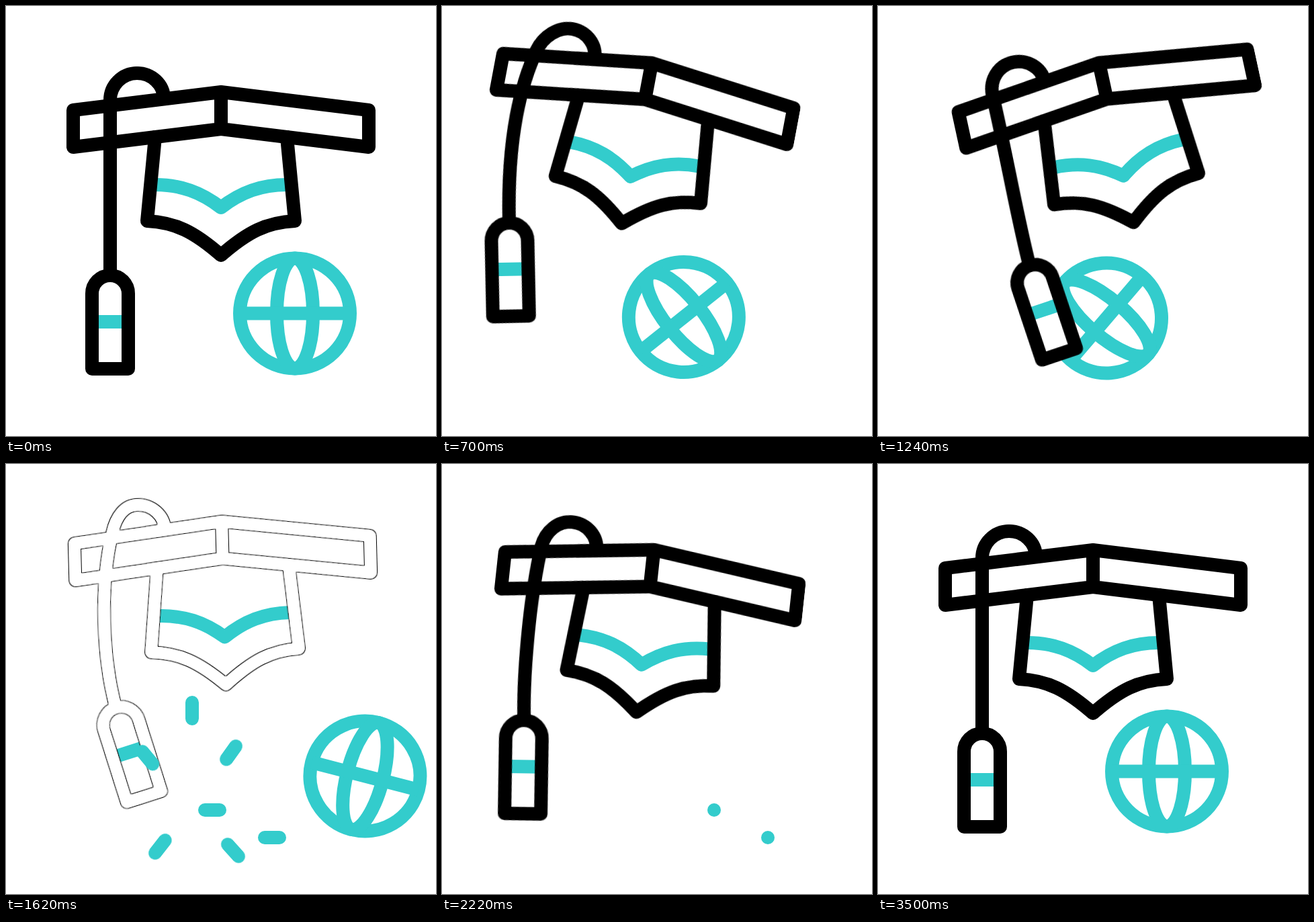
These frames come from a looping animation (640x640 px, 3560 ms). An HTML page without scripts:

```html
<!DOCTYPE html>
<html lang="en">
<head>
<meta charset="utf-8">
<title>Graduation cap and globe</title>
<style>
  html, body { margin: 0; width: 100%; height: 100%; overflow: hidden; background: #fff; }
  svg { display: block; width: 100vw; height: 100vh; }
  svg * { animation: 3560ms cubic-bezier(.37, 0, .63, 1) infinite; }

  .ink, .teal { fill: none; stroke-width: 20; stroke-linecap: round; stroke-linejoin: round; }
  .ink { stroke: #000; }
  .teal { stroke: #3cc; }
  .flat { stroke-linecap: butt; }

  .cap { transform-origin: 320px 86px; animation-name: lift, sway; }
  .tassel { transform-origin: 155px 400px; animation-name: swing; }
  .strand { animation-name: bend; }
  .ink { animation-name: hollow; animation-timing-function: step-end; }
  .globe { transform-origin: 430px 457.5px; animation-name: travel, roll; }
  .spark { animation-name: spark; }
  .trail { --run: 123px; animation-name: trail; }
  .short { --run: 114px; }
  .late { animation-delay: -2300ms; }

  @keyframes lift {
    0%, 6.18% { translate: 0 0; }
    16.85%, 52.25% { translate: 0 -42.4px; }
    61.8%, 100% { translate: 0 0; }
  }
  @keyframes sway {
    0%, 6.18% { rotate: 0deg; }
    24.16% { rotate: 12.4deg; }
    38.48% { rotate: -16.5deg; }
    52.25%, 52.81% { rotate: 12.4deg; }
    71.91%, 100% { rotate: 0deg; }
  }
  @keyframes swing {
    0%, 6.18% { rotate: 0deg; }
    19.66% { rotate: -11.8deg; }
    28.09% { rotate: -1deg; }
    44.94%, 45.6% { rotate: -16.1deg; }
    52.25% { rotate: -6deg; }
    62.36% { rotate: -5.3deg; }
    71.91%, 100% { rotate: 0deg; }
  }
  @keyframes bend {
    0%, 6.18% { d: path("M155 400C155 313 155 227 155 140C155 118 173 100 195 100"); }
    19.66% { d: path("M155 400C137 315 128 219 148 141C154 119 173 100 195 100"); }
    28.09% { d: path("M155 400C160 313 168 227 154 140C152 118 172 100 195 100"); }
    44.94%, 45.6% { d: path("M155 400C138 328 135 220 157 140C163 116 176 100 195 100"); }
    52.25%, 62.36% { d: path("M155 400C147 340 143 227 153 140C157 118 173 100 195 100"); }
    71.91%, 100% { d: path("M155 400C155 313 155 227 155 140C155 118 173 100 195 100"); }
  }
  /* the black briefly drops out, leaving thin outlines */
  @keyframes hollow {
    0% { filter: none; }
    45.5% { filter: url(#outline); }
    46.06%, 100% { filter: none; }
  }
  @keyframes travel {
    0%, 6.18% { translate: 0 0; }
    25.84%, 35.96% { translate: -90px 7px; }
    55.9%, 62.91% { translate: 325px 7px; }
    62.92% { translate: -530px 0; }
    89.89%, 100% { translate: 0 0; }
  }
  @keyframes roll {
    0%, 6.18% { rotate: 0deg; }
    25.84%, 35.96% { rotate: -49.5deg; }
    55.9%, 62.91% { rotate: 87deg; }
    62.92% { rotate: -270deg; }
    89.89%, 100% { rotate: 0deg; }
  }
  @keyframes spark {
    0%, 37.63% { opacity: 0; stroke-dasharray: 0 999; stroke-dashoffset: 0; }
    37.64% { opacity: 1; stroke-dasharray: 0 999; stroke-dashoffset: 0; }
    41.57% { stroke-dasharray: 34 999; stroke-dashoffset: -16px; }
    45.51% { stroke-dasharray: 24 999; stroke-dashoffset: -46px; }
    49.43% { opacity: 1; stroke-dasharray: 0 999; stroke-dashoffset: -70px; }
    49.44%, 100% { opacity: 0; stroke-dasharray: 0 999; stroke-dashoffset: -70px; }
  }
  @keyframes trail {
    0%, 43.81% { opacity: 0; stroke-dasharray: 0 999; stroke-dashoffset: 0; }
    43.82% { opacity: 1; stroke-dasharray: 0 999; stroke-dashoffset: 0; }
    45.51% { stroke-dasharray: 22 999; stroke-dashoffset: -14px; }
    53.37% { stroke-dasharray: 28 999; stroke-dashoffset: -70px; }
    62.3%, 62.91% { opacity: 1; stroke-dasharray: 0 999; stroke-dashoffset: calc(-1 * var(--run)); }
    62.92%, 100% { opacity: 0; stroke-dasharray: 0 999; stroke-dashoffset: calc(-1 * var(--run)); }
  }
</style>
</head>
<body>
<svg viewBox="0 0 640 640">
  <filter id="outline" filterUnits="userSpaceOnUse" x="0" y="0" width="640" height="640">
    <feMorphology in="SourceAlpha" operator="erode" radius="1" result="inner"/>
    <feFlood flood-color="#fff"/>
    <feComposite in2="inner" operator="in" result="core"/>
    <feMerge><feMergeNode in="SourceGraphic"/><feMergeNode in="core"/></feMerge>
  </filter>

  <g class="globe">
    <g class="teal flat">
      <circle cx="430" cy="457.5" r="82"/>
      <ellipse cx="430" cy="457.5" rx="27" ry="82"/>
      <path d="M348 457.5H512"/>
    </g>
  </g>

  <g class="cap">
    <path class="teal flat" d="M222 266C260 266 290 277 320 300C350 277 380 266 418 266"/>
    <g class="tassel">
      <path fill="#fff" d="M128 540V428a27 27 0 0 1 54 0V540Z"/>
      <path class="teal flat" d="M128 470H182"/>
    </g>
    <g class="ink">
      <path d="M222 195L210 320C252 322 280 336 320 371C360 336 388 322 430 320L418 195"/>
      <path d="M100 155L320 128L540 155V210L320 183L100 210ZM320 128V183"/>
      <path class="strand" d="M155 400C155 313 155 227 155 140C155 118 173 100 195 100"/>
      <path d="M195 100C217 100 235 117 235 138"/>
      <path class="tassel" d="M128 540V428a27 27 0 0 1 54 0V540Z"/>
    </g>
  </g>

  <g class="teal">
    <path class="spark" d="M-70 0H0" transform="translate(277 355) rotate(-90)"/>
    <path class="spark" d="M-70 0H0" transform="translate(342 420) rotate(-54.5)"/>
    <path class="spark" d="M-70 0H0" transform="translate(346 584) rotate(48)"/>
    <path class="spark" d="M-70 0H0" transform="translate(222 579) rotate(128)"/>
    <path class="spark" d="M70 0H0" transform="translate(203 428) rotate(50.5)"/>
    <path class="trail" d="M282 515h150"/>
    <path class="trail short" d="M371 556h150"/>
    <path class="trail late" d="M252 565h150"/>
  </g>
</svg>
</body>
</html>
```
